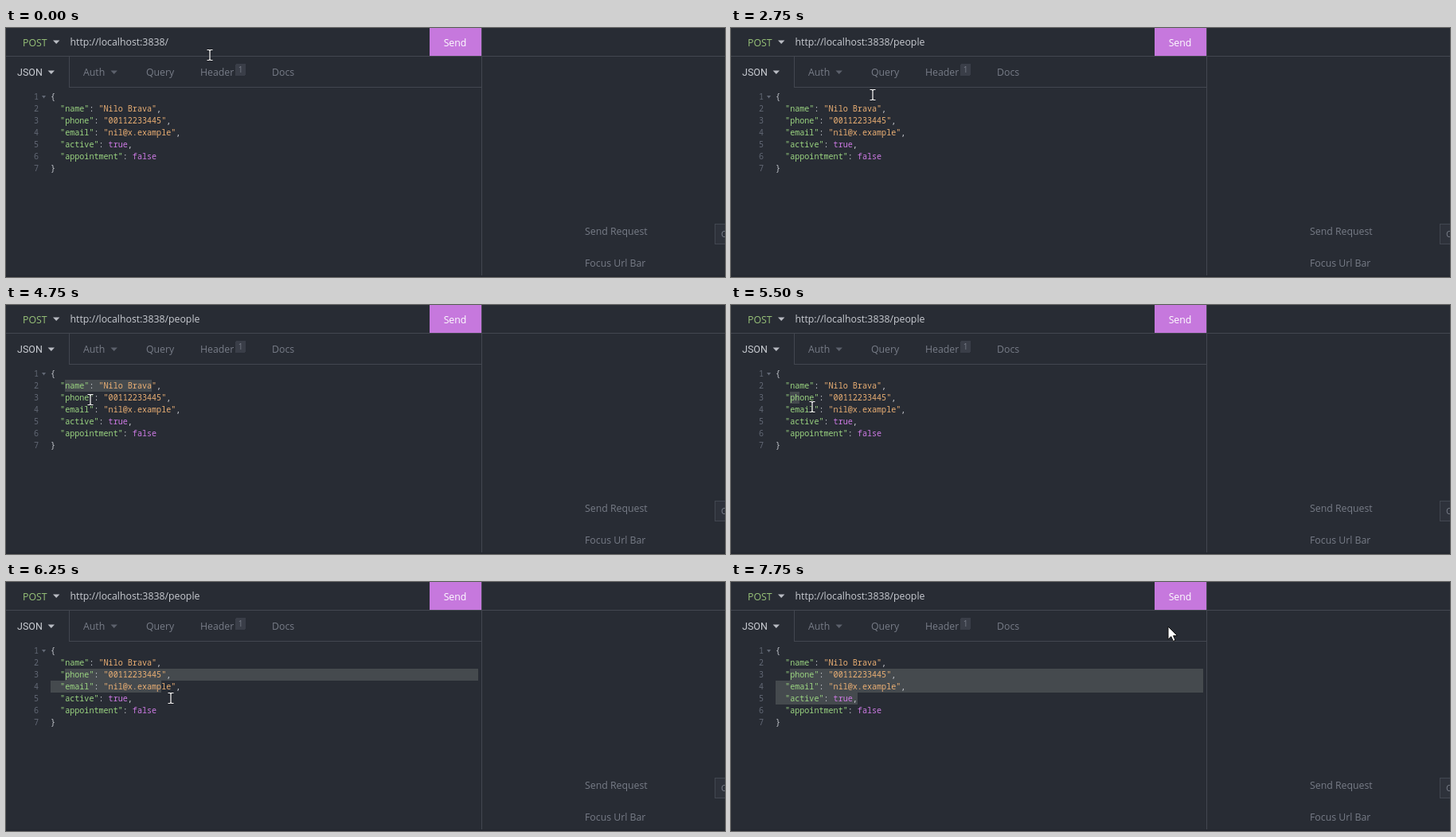
Recreate the animation shown at these times as an HTML page. Size 903 by 313 pixels, loop 8 s.

```html
<!DOCTYPE html>
<html lang="en">
<head>
<meta charset="utf-8">
<title>Request editor</title>
<style>
  html, body { margin: 0; width: 100%; height: 100%; overflow: hidden; background: #282c34; }
  svg { display: block; width: 903px; height: 313px; }
  text { font: 12.3px "Open Sans", "Noto Sans", sans-serif; white-space: pre; }
  .bright { fill: #c9ccd2; }
  .dim { fill: #777c87; }
  .json { font: 12.5px Roboto, sans-serif; }
  .code text { font: 500 10.083px "Noto Sans Mono", "DejaVu Sans Mono", monospace; }
  .code .num { fill: #626875; font-weight: 400; text-anchor: end; }
  .plain { fill: #c9ccd2; }
  .key { fill: #9bd581; }
  .str { fill: #ecb074; }
  .atom { fill: #cf7be6; }
  .sel { fill: #454a4e; }
  .rule { fill: #434750; }
  rect { shape-rendering: crispEdges; }
</style>
</head>
<body>
<svg viewBox="0 0 903 313" xmlns="http://www.w3.org/2000/svg">
  <rect width="903" height="313" fill="#282c34"/>
  <rect y="311" width="903" height="2" fill="#242830"/>

  <rect class="rule" y="35" width="903" height="1"/>
  <rect class="rule" x="79" y="36" width="1" height="39"/>
  <rect class="rule" x="79" y="74" width="518" height="1"/>
  <rect class="rule" x="597" width="1" height="311"/>

  <text x="21" y="23" fill="#98c379">POST</text>
  <path d="M59 15.5h8.4l-4.2 4.6z" fill="#b9bcc3"/>
  <text id="url" class="bright" x="80.5" y="22"></text>
  <rect id="urlCaret" y="9" width="1" height="17" fill="#d5d8dd"/>
  <rect x="532" width="65" height="35" fill="#c678dd"/>
  <text x="564" y="23" fill="#fff" text-anchor="middle">Send</text>

  <text class="bright json" x="14" y="60">JSON</text>
  <path d="M52.6 53.5h8.4l-4.2 4.6z" fill="#b9bcc3"/>
  <g class="dim">
    <text x="97" y="60">Auth</text>
    <path d="M131.5 53.5h8.4l-4.2 4.6z" fill="#5c616c"/>
    <text x="176" y="60">Query</text>
    <text x="244" y="60">Header</text>
    <rect x="288" y="45" width="13" height="15" rx="2" fill="#3a3e48"/>
    <text x="294.6" y="56" text-anchor="middle" style="font-size:10px">1</text>
    <text x="334" y="60">Docs</text>
    <text x="727" y="260">Send Request</text>
    <text x="727" y="300">Focus Url Bar</text>
    <rect x="890.5" y="246.5" width="30" height="25" fill="#2e323b" stroke="#424751"/>
    <text x="898" y="263" style="font-size:11px">Ctrl</text>
  </g>

  <rect id="activeLine" x="21" y="94" width="576" height="15" fill="#2f333d"/>
  <g id="selection" class="sel"></g>
  <g id="code" class="code"></g>
  <path d="M45 85h5l-2.5 3.5z" fill="#626875"/>
  <rect id="codeCaret" x="74" y="94" width="1" height="15" fill="#c9ccd2"/>

  <g id="beam" fill="none">
    <path d="M-3.5 -6.5h2.5l1 1l1 -1h2.5M0 -5.5v11M-3.5 6.5h2.5l1 -1l1 1h2.5" stroke="#15171b" stroke-width="2.6" opacity=".55"/>
    <path d="M-3.5 -6.5h2.5l1 1l1 -1h2.5M0 -5.5v11M-3.5 6.5h2.5l1 -1l1 1h2.5" stroke="#fff" stroke-width="1.2"/>
  </g>
  <path id="arrow" d="M0 0V16.2L3.8 12.6L6.4 18.4L9 17.3L6.5 11.6H11.6Z" fill="#fff" stroke="#111" stroke-width="1"/>
</svg>
<script>
const LOOP = 8000, CHAR = 6.05, LEFT = 56, TOP = 79, ROW = 15, RIGHT = 593;
const $ = id => document.getElementById(id);

function add(parent, tag, attrs, content = '') {
  const el = document.createElementNS('http://www.w3.org/2000/svg', tag);
  for (const name in attrs) el.setAttribute(name, attrs[name]);
  el.textContent = content;
  return parent.appendChild(el);
}

const lines = [
  '{',
  '  "name": "Nilo Brava",',
  '  "phone": "00112233445",',
  '  "email": "nil@x.example",',
  '  "active": true,',
  '  "appointment": false',
  '}'
];

function tokenClass(token, rest) {
  if (token[0] === '"') return rest[0] === ':' ? 'key' : 'str';
  return /^[tf]/.test(token) ? 'atom' : 'plain';
}

lines.forEach((line, i) => {
  const y = TOP + i * ROW + 11;
  add($('code'), 'text', { class: 'num', x: 41, y }, i + 1);
  const row = add($('code'), 'text', { x: LEFT, y });
  for (const m of line.matchAll(/"[^"]*"|\w+|[^"\w]+/g)) {
    const rest = line.slice(m.index + m[0].length);
    add(row, 'tspan', { class: tokenClass(m[0], rest) }, m[0]);
  }
});

// [time, x, y] of the mouse
const mouse = [
  [0, 256, 34], [250, 195.5, 16], [500, 254, 31],
  [2500, 236, 48], [2750, 178, 84], [3000, 116, 108], [3250, 86, 121], [3500, 82, 116],
  [4000, 112, 116], [4250, 162, 117], [4500, 192, 118], [4750, 106, 119],
  [5000, 73, 124], [5250, 86, 127], [5500, 102, 128], [5750, 150, 132], [6000, 203, 136],
  [6250, 207, 146], [6500, 196, 162], [6750, 173, 167], [7000, 220, 150], [7250, 340, 104],
  [7500, 480, 72], [7750, 549, 56]
];
// [time, first row, last row, end column]; each selection starts at column 3
const picks = [
  [0], [4000, 1, 1, 8], [4250, 1, 1, 16], [4500, 1, 1, 21],
  [5250, 2, 2, 4], [5500, 2, 2, 5], [5750, 2, 2, 13], [6000, 2, 2, 22],
  [6250, 2, 3, 23], [6500, 2, 4, 17]
];
// [time, letters typed]
const typed = [[0, 0], [1000, 1], [1250, 2], [1500, 3], [1750, 4], [2000, 6]];

const at = (table, t) => table.findLast(step => step[0] <= t);
const show = (el, on) => el.setAttribute('visibility', on ? 'visible' : 'hidden');

function drawSelection([, first, last, endCol]) {
  $('selection').replaceChildren();
  for (let row = first; row <= last; row++) {
    const x = LEFT + (row === first ? 3 * CHAR : 0);
    const end = row === last ? LEFT + endCol * CHAR : RIGHT;
    add($('selection'), 'rect', { x, y: TOP + row * ROW, width: end - x, height: ROW });
  }
}

function draw(t) {
  const url = $('url');
  url.textContent = 'http://localhost:3838/' + 'people'.slice(0, at(typed, t)[1]);
  $('urlCaret').setAttribute('x', Math.round(80.5 + url.getComputedTextLength()));
  show($('urlCaret'), t >= 500 && t < 2500);

  const clicked = t >= 3750 && t < 4000;
  show($('activeLine'), clicked);
  show($('codeCaret'), clicked);
  drawSelection(at(picks, t));

  const [, x, y] = at(mouse, t);
  const pointer = t >= 7500;
  $('beam').setAttribute('transform', `translate(${x} ${y})`);
  $('arrow').setAttribute('transform', `translate(${x} ${y})`);
  show($('beam'), !pointer);
  show($('arrow'), pointer);
}

const start = performance.now();
let shown = -1;
function tick() {
  const step = Math.floor((performance.now() - start) % LOOP / 250);
  if (step !== shown) draw((shown = step) * 250);
  requestAnimationFrame(tick);
}
tick();
</script>
</body>
</html>
```
